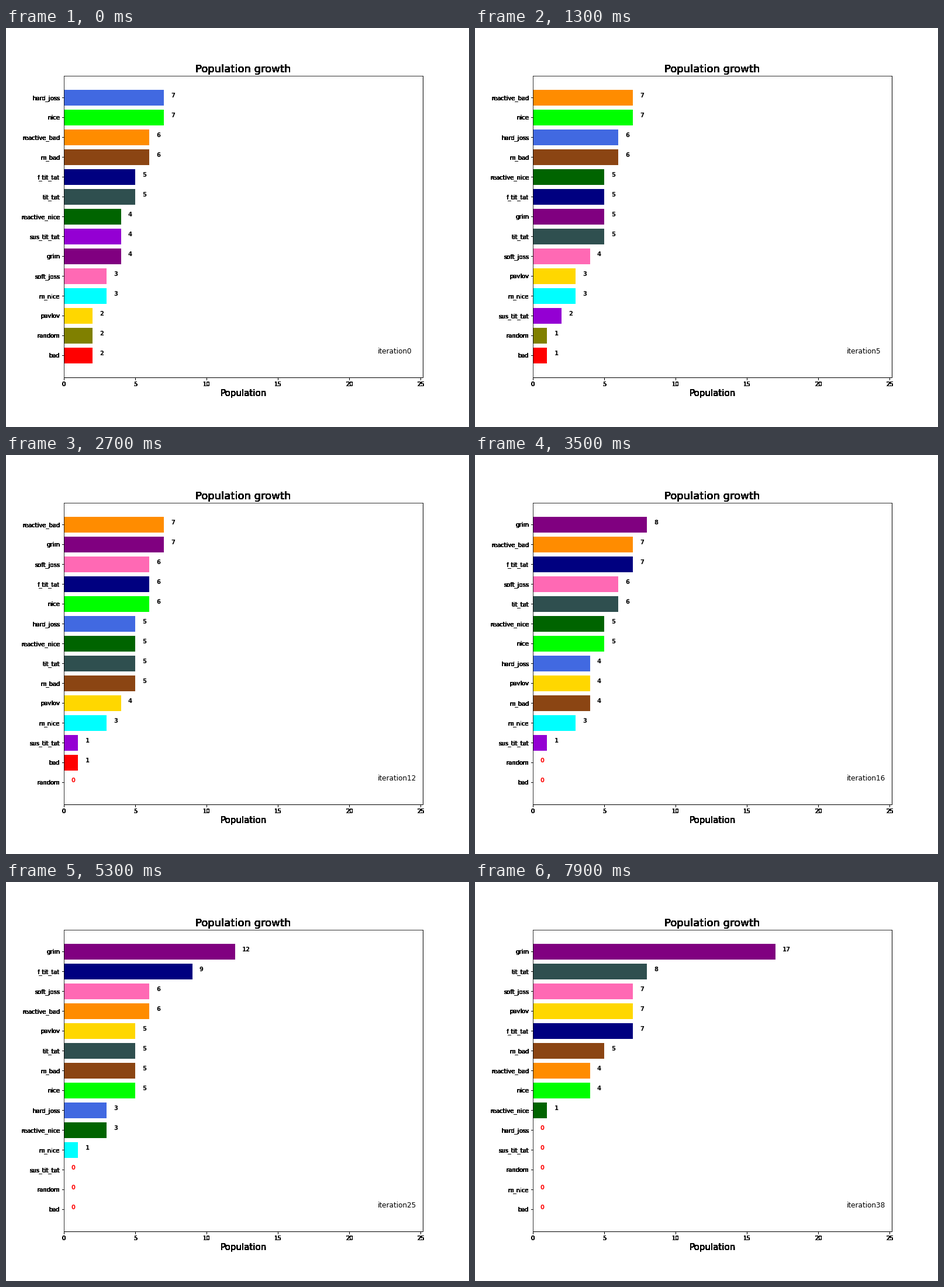
Animation, 792 px wide and 684 px high, one loop 8000 ms. Source, as a matplotlib script:

```python
import matplotlib.pyplot as plt
import numpy as np
from matplotlib.animation import FuncAnimation

STEP = 100        # ms per tick
LOOP = 8000

# Colour and turning points (iteration, population) of each strategy.
# Equal populations are ranked in this order.
TEAMS = {
    "soft_joss": ("hotpink", [(0, 2.6), (12, 5.7), (38, 7.2)]),
    "hard_joss": ("royalblue", [(0, 6.95), (25, 2.8), (30, 0)]),
    "reactive_bad": ("darkorange", [(0, 6), (12, 7.4), (38, 4)]),
    "pavlov": ("gold", [(0, 2.3), (8, 3.6), (38, 6.9)]),
    "reactive_nice": ("darkgreen", [(0, 4.45), (14, 4.85), (32, 2.6), (38, 0.6)]),
    "f_tit_tat": ("navy", [(0, 4.6), (8, 5.1), (24, 9), (38, 7.3)]),
    "sus_tit_tat": ("darkviolet", [(0, 4), (8, 1.2), (24, 0)]),
    "grim": ("purple", [(0, 4.3), (8, 5), (36, 17)]),
    "tit_tat": ("darkslategray", [(0, 5), (16, 5.6), (25, 5.1), (38, 7.6)]),
    "random": ("olive", [(0, 2.2), (12, 0)]),
    "m_bad": ("saddlebrown", [(0, 6.2), (16, 4.2), (25, 5)]),
    "m_nice": ("cyan", [(0, 3), (16, 3), (25, 1.2), (38, 0)]),
    "nice": ("lime", [(0, 7), (8, 7), (16, 5.4), (38, 3.8)]),
    "bad": ("red", [(0, 1.7), (16, 0.3)]),
}


def ranking(iteration):
    """(name, colour, whole population) from the smallest to the largest."""
    teams = [(name, colour, round(np.interp(iteration, *zip(*points))))
             for name, (colour, points) in TEAMS.items()]
    return sorted(teams, key=lambda team: -team[2])[::-1]


def thicken(artist, times=16):
    """Overdraw an artist so that its smoothed edges turn solid."""
    draw = artist.draw

    def repeated(renderer):
        for _ in range(times):
            draw(renderer)

    artist.draw = repeated


plt.rcParams["font.family"] = "DejaVu Sans"
fig = plt.figure(figsize=(11, 9.5), dpi=72, facecolor="white")
ax = fig.add_axes([0.125, 0.125, 0.775, 0.755])
rows = range(len(TEAMS))
bars = ax.barh(rows, 0, height=0.8)
values = [ax.text(0, y, "", size=10, weight="bold") for y in rows]
counter = ax.text(22, 0.1, "", size=12)

ax.set_title("Population growth", size=18)
ax.set_xlabel("Population", size=15)
ax.set_xticks(range(0, 26, 5))
ax.set_yticks(rows, list(TEAMS))
ax.set_xlim(0, 25.143)
ax.set_ylim(-1.09, 14.09)

# Everything outside the plot area is solid, with the edges that border it.
for artist in [ax.title, ax.xaxis.label, ax.spines["right"], ax.spines["bottom"],
               *ax.xaxis.get_major_ticks(), *ax.yaxis.get_major_ticks()]:
    thicken(artist)


def update(tick):
    t = tick * STEP
    iteration = 0 if t < 500 else (t - 500) // 200 + 1
    teams = ranking(iteration)
    for bar, value, (_, colour, n) in zip(bars, values, teams):
        bar.set_width(n)
        bar.set_facecolor(colour)
        value.set_x(n + 0.5)
        value.set_text(str(n))
        value.set_color("black" if n else "red")
    ax.set_yticklabels([name for name, *_ in teams])
    counter.set_text(f"iteration{iteration}")
    return []


anim = FuncAnimation(fig, update, frames=LOOP // STEP, interval=STEP, repeat=True)
plt.show()
```
